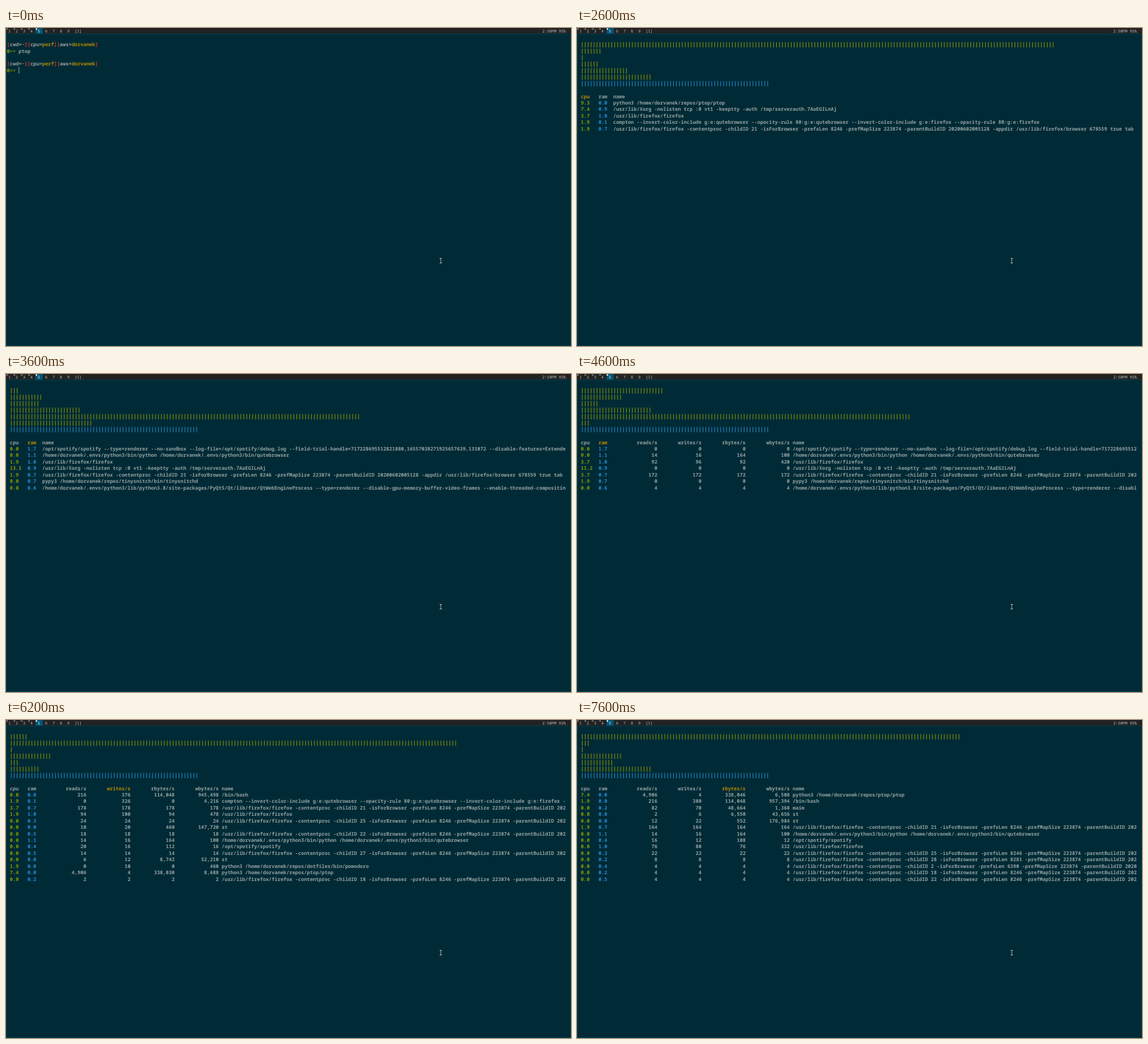
An HTML page that plays this animation: 998 px wide and 561 px high, repeating every 8 s.

```html
<!DOCTYPE html>
<html lang="en">
<head>
<meta charset="utf-8">
<title>Process monitor</title>
<style>
html, body { margin: 0; width: 100%; height: 100%; overflow: hidden; background: #002b36; }
svg { display: block; width: 998px; height: 561px; }
text { font-family: "Noto Sans Mono", monospace; white-space: pre; text-rendering: geometricPrecision; }
#term text { font-size: 8.663px; font-weight: 600; }
#bar text { font-size: 6.93px; fill: #bbb; }
</style>
</head>
<body>
<svg viewBox="0 0 998 561">
  <rect width="998" height="561" fill="#002b36"/>
  <rect x=".26" y="10.14" width="997.48" height="550.6" fill="none" stroke="#005577" stroke-width=".52"/>
  <g id="bar"></g>
  <g id="term"></g>
  <g fill="none">
    <path d="M765.9 406.4h4.2M768 406.4v8.2M765.9 414.6h4.2" stroke="#00161c" stroke-width="2"/>
    <path d="M765.9 406.4h4.2M768 406.4v8.2M765.9 414.6h4.2" stroke="#c4cacb" stroke-width="1"/>
  </g>
</svg>
<script>
(() => {
const LOOP = 8000, COLS = 190, CW = 5.198, LH = 11.436, X0 = 1.56, Y0 = 11.44;
const GREY = '#93a1a1', GOLD = '#b58900', RED = '#dc322f', GREEN = '#859900', BLUE = '#268bd2';
const HOME = '/home/dorvanek';
const term = document.getElementById('term');

// Commands by short key; a numeric key is a browser child process.
const CMD = {
  x: '/usr/lib/Xorg -nolisten tcp :0 vt1 -keeptty -auth /tmp/serverauth.7AaEGILnAj',
  p: `python3 ${HOME}/repos/ptop/ptop`,
  d: `python3 ${HOME}/repos/dotfiles/bin/pomodoro`,
  f: '/usr/lib/firefox/firefox',
  c: 'compton --invert-color-include g:e:qutebrowser --opacity-rule 80:g:e:qutebrowser --invert-color-include g:e:firefox --opacity-rule 80:g:e:firefox',
  s: '/opt/spotify/spotify --type=renderer --no-sandbox --log-file=/opt/spotify/debug.log --field-trial-handle=717228695512821880,16557038271925657639,131072 --disable-features=Extende',
  o: '/opt/spotify/spotify',
  q: `${HOME}/.envs/python3/bin/python ${HOME}/.envs/python3/bin/qutebrowser`,
  t: `pypy3 ${HOME}/repos/tinysnitch/bin/tinysnitchd`,
  w: `${HOME}/.envs/python3/lib/python3.8/site-packages/PyQt5/Qt/libexec/QtWebEngineProcess --type=renderer --disable-gpu-memory-buffer-video-frames --enable-threaded-compositing`,
  b: '/bin/bash', st: 'st', m: 'maim'
};
const PREFS = { 2: 6390, 28: 8281 };
const command = key => CMD[key] ||
  `${CMD.f} -contentproc -childID ${key} -isForBrowser -prefsLen ${PREFS[key] || 8246} -prefMapSize 223874` +
  ' -parentBuildID 20200602005128 -appdir /usr/lib/firefox/browser 678559 true tab';

const put = (s, col, line, fill = GREY) =>
  `<text x="${(X0 + col * CW).toFixed(2)}" y="${(Y0 + line * LH + 9.2).toFixed(2)}" fill="${fill}">${s}</text>`;

function gauge(n, line, color) {
  const x = X0 + 1.5 * CW - .55, y = (Y0 + line * LH + 6.7).toFixed(2);
  return `<path d="M${x.toFixed(2)} ${y}h${((n - 1) * CW + 1.1).toFixed(2)}" stroke="${color}"` +
    ` stroke-width="9.2" stroke-dasharray="1.1 ${(CW - 1.1).toFixed(3)}"/>`;
}

function prompt(line, typed, cursor) {
  let col = 0, out = '';
  const add = (s, c) => { out += put(s, col, line, c); col += s.length; };
  for (const [k, v] of [['cwd', '~'], ['cpu', 'perf'], ['aws', 'dorvanek']]) {
    add('[', RED); add(k + '=', GREY); add(v, GOLD); add(']', RED);
  }
  out += put('0>>', 0, line + 1, GREEN) + put(typed, 4, line + 1);
  if (cursor) {
    const x = X0 + (4 + typed.length) * CW;
    out += `<rect x="${x}" y="${Y0 + (line + 1) * LH}" width="1" height="${LH}" fill="#a9b4b4"/>`;
  }
  return out;
}

const HEAD = ['cpu', 'ram', 'reads/s', 'writes/s', 'rbytes/s', 'wbytes/s'];
const LEFT = [1, 7], RIGHT = [0, 0, 27, 42, 57, 72];

// Each row: cpu ram [reads writes rbytes wbytes] key
function table(sort, bars, rows, n, nameCol) {
  const at = (s, i) => i < 2 ? LEFT[i] : RIGHT[i] - s.length;
  let out = bars.map((b, i) => gauge(b, i + 1, GREEN)).join('') + gauge(64, 7, BLUE);
  for (let i = 0; i < n; i++) out += put(HEAD[i], at(HEAD[i], i), 9, HEAD[i] === sort ? GOLD : GREY);
  out += put('name', nameCol, 9);
  rows.split('|').filter(Boolean).forEach((row, r) => {
    const cells = row.split(' '), line = 10 + r;
    for (let i = 0; i < n; i++) out += put(cells[i], at(cells[i], i), line, [GREEN, BLUE][i]);
    out += put(command(cells[n]).slice(0, COLS - nameCol), nameCol, line);
  });
  return out;
}

const brief = (sort, bars, rows) => () => table(sort, bars, rows, 2, 12);
const full = (sort, bars, rows) => () => table(sort, bars, rows, 6, 73);

const SCENES = [
  [0, () => prompt(1, 'ptop') + prompt(4, '', true)],
  [600, () => prompt(1, '', true)],
  [1000, () => prompt(1, 'pto', true)],
  [1200, () => prompt(1, 'ptop', true)],
  [1400, () => ''],
  [1800, brief('cpu', [10, 125, 3, 14, 24, 6], '')],
  [2200, brief('cpu', [24, 14, 6, 118, 3, 11], '7.4 0.9 x|5.6 0.0 p|3.7 0.7 21|1.9 1.0 f')],
  [2600, brief('cpu', [161, 7, 1, 6, 16, 24], '9.3 0.0 p|7.4 0.9 x|3.7 1.0 f|1.9 0.1 c|1.9 0.7 21')],
  [2800, brief('cpu', [14, 24, 3, 128, 10, 6],
    '9.3 0.9 x|7.4 0.0 p|3.7 0.7 21|3.7 1.0 f|1.9 0.1 c|1.9 0.4 o|1.9 0.0 d')],
  [3200, brief('cpu', [14, 6, 121, 11, 24, 3],
    '11.2 0.9 x|7.4 0.0 p|3.7 1.0 f|1.9 0.7 21|1.9 0.1 c|1.9 0.4 o|1.9 0.7 t|1.9 0.0 st')],
  [3600, brief('ram', [3, 11, 10, 24, 119, 28],
    '0.0 1.7 s|0.0 1.1 q|1.9 1.0 f|13.1 0.9 x|1.9 0.7 21|0.0 0.7 t|0.0 0.6 w')],
  [4000, brief('ram', [24, 6, 116, 10, 3, 28],
    '1.9 1.7 s|0.0 1.1 q|3.7 1.0 f|11.2 0.9 x|3.7 0.7 21|1.9 0.7 t|0.0 0.6 w')],
  [4400, brief('ram', [11, 157, 3, 6, 10, 24],
    '0.0 1.7 s|0.0 1.1 q|1.9 1.0 f|9.3 0.9 x|1.9 0.7 21|0.0 0.7 t|0.0 0.6 w')],
  [4600, full('ram', [28, 14, 6, 24, 112, 3],
    '0.0 1.7 0 0 0 0 s|0.0 1.1 14 16 164 100 q|3.7 1.0 92 96 92 420 f|11.2 0.9 0 0 0 0 x|' +
    '3.7 0.7 172 172 172 172 21|1.9 0.7 0 0 0 0 t|0.0 0.6 4 4 4 4 w')],
  [5000, full('ram', [6, 24, 10, 133, 3, 14],
    '0.0 1.7 0 0 0 0 s|0.0 1.1 12 14 148 84 q|3.7 1.0 78 82 78 316 f|9.3 0.9 0 0 0 0 x|' +
    '3.7 0.7 176 176 176 176 21|0.0 0.7 0 0 0 0 t|0.0 0.6 0 0 0 0 w')],
  [5400, full('ram', [35, 82, 35, 11, 27, 1],
    '1.9 1.7 0 0 0 0 s|0.0 1.1 14 16 164 100 q|1.9 1.0 84 88 84 340 f|13.0 0.9 0 0 0 0 x|' +
    '5.6 0.7 180 180 180 180 21|0.0 0.7 0 0 0 0 t|0.0 0.6 0 0 0 0 w')],
  [5800, full('reads/s', [14, 24, 126, 3, 10, 6],
    '7.4 0.0 4,906 4 338,030 8,688 p|1.9 0.0 216 376 114,048 945,498 b|3.7 0.7 174 174 174 174 21|' +
    '1.9 1.0 88 94 88 412 f|0.0 0.3 24 24 24 24 25|0.0 0.4 20 16 112 16 o|0.0 0.5 18 18 18 18 22|' +
    '0.0 1.1 14 16 164 100 q|0.0 0.5 14 14 14 14 27|0.0 0.0 10 20 460 147,720 st|' +
    '0.0 0.2 8 8 8 8 28|0.0 0.0 6 12 8,742 52,210 st|0.0 0.4 4 4 4 4 2|0.0 0.6 4 4 4 4 w|' +
    '0.0 0.2 2 2 2 2 18|0.0 0.2 2 2 2 2 24')],
  [6200, full('writes/s', [6, 152, 1, 14, 3, 10],
    '0.0 0.0 216 376 114,048 945,498 b|1.9 0.1 0 326 0 4,216 c|3.7 0.7 178 178 178 178 21|' +
    '1.9 1.0 94 100 94 478 f|0.0 0.3 24 24 24 24 25|0.0 0.0 10 20 460 147,720 st|' +
    '0.0 0.5 18 18 18 18 22|0.0 1.1 14 16 164 100 q|0.0 0.4 20 16 112 16 o|0.0 0.5 14 14 14 14 27|' +
    '0.0 0.0 6 12 8,742 52,210 st|1.9 0.0 0 10 0 460 d|7.4 0.0 4,906 4 338,030 8,688 p|' +
    '0.0 0.2 2 2 2 2 18')],
  [6400, full('writes/s', [24, 3, 14, 6, 122, 11],
    '1.9 0.0 216 380 114,048 951,446 b|1.9 0.1 0 318 0 4,108 c|3.7 0.7 170 170 170 170 21|' +
    '1.9 1.0 86 92 86 404 f|0.0 0.3 22 22 22 22 25|0.0 0.0 12 22 506 158,312 st|' +
    '0.0 1.1 14 16 164 100 q|0.0 0.5 16 16 16 16 22|0.0 0.4 16 12 108 12 o|0.0 0.0 4 10 7,646 48,120 st|' +
    '0.0 0.2 8 8 8 8 28|7.4 0.0 4,906 4 338,038 7,598 p|0.0 0.4 4 4 4 4 2|0.0 0.2 2 2 2 2 18')],
  [6800, full('rbytes/s', [3, 11, 24, 131, 6, 14],
    '9.3 0.0 4,906 4 338,038 7,598 p|0.0 0.0 216 378 114,048 951,446 b|0.0 0.0 4 10 7,646 48,120 st|' +
    '0.0 0.0 12 22 506 158,312 st|3.7 0.7 172 172 172 172 21|0.0 1.1 14 16 164 100 q|' +
    '0.0 0.4 18 14 110 14 o|1.9 1.0 84 88 84 372 f|0.0 0.3 24 24 24 24 25|0.0 0.5 16 16 16 16 22|' +
    '0.0 0.5 12 12 12 12 27|0.0 0.2 8 8 8 8 28|0.0 0.4 4 4 4 4 2|0.0 0.2 4 4 4 4 18|0.0 0.6 2 2 2 2 w')],
  [7200, full('rbytes/s', [14, 24, 6, 10, 3, 127],
    '7.4 0.0 4,906 4 338,042 7,014 p|1.9 0.0 216 380 114,048 954,420 b|0.0 0.0 4 8 7,102 45,880 st|' +
    '0.0 0.0 12 22 528 167,648 st|1.9 0.7 168 168 168 168 21|0.0 1.1 14 16 164 100 q|' +
    '0.0 0.4 18 14 110 14 o|1.9 1.0 80 84 80 352 f|0.0 0.3 22 22 22 22 25|0.0 0.5 14 14 14 14 22|' +
    '0.0 0.5 10 10 10 10 27|0.0 0.2 8 8 8 8 28|0.0 0.4 4 4 4 4 2|0.0 0.2 2 2 2 2 18')],
  [7600, full('rbytes/s', [129, 3, 1, 14, 11, 24],
    '7.4 0.0 4,906 4 338,046 6,508 p|1.9 0.0 216 380 114,048 957,394 b|0.0 0.2 82 70 48,664 1,368 m|' +
    '0.0 0.0 2 6 6,550 43,656 st|0.0 0.0 12 22 552 176,984 st|1.9 0.7 164 164 164 164 21|' +
    '0.0 1.1 14 16 164 100 q|0.0 0.4 16 12 108 12 o|0.0 1.0 76 80 76 332 f|0.0 0.3 22 22 22 22 25|' +
    '0.0 0.2 8 8 8 8 28|0.0 0.4 4 4 4 4 2|0.0 0.2 4 4 4 4 18|0.0 0.5 4 4 4 4 22')]
];

function statusBar() {
  const label = (s, x, fill = '#bbb') => `<text x="${x}" y="7.8" style="fill:${fill}">${s}</text>`;
  let out = '<rect width="998" height="9.88" fill="#222"/>';
  for (let i = 0; i < 9; i++) {
    const x = i * 13, on = i === 4, color = on ? '#eee' : '#bbb';
    if (on) out += `<rect x="${x}" width="13" height="9.88" fill="#005577"/>`;
    if (i < 5) out += `<rect x="${x + .8}" y=".8" width="2" height="2" fill="${on ? color : 'none'}"` +
      ` stroke="${color}" stroke-width=".52"/>`;
    out += label(i + 1, x + 4.1, color);
  }
  return out + label('[1]', 121.2) + label('2:50PM 95%', 947.2);
}
document.getElementById('bar').innerHTML = statusBar();

let shown = null;
function render(ms) {
  const t = ms % LOOP;
  const scene = SCENES.filter(s => s[0] <= t).pop();
  if (scene === shown) return;
  shown = scene;
  term.innerHTML = scene[1]();
}

const start = performance.now();
function tick() {
  render(Math.max(0, performance.now() - start));
  requestAnimationFrame(tick);
}
tick();
})();
</script>
</body>
</html>
```
